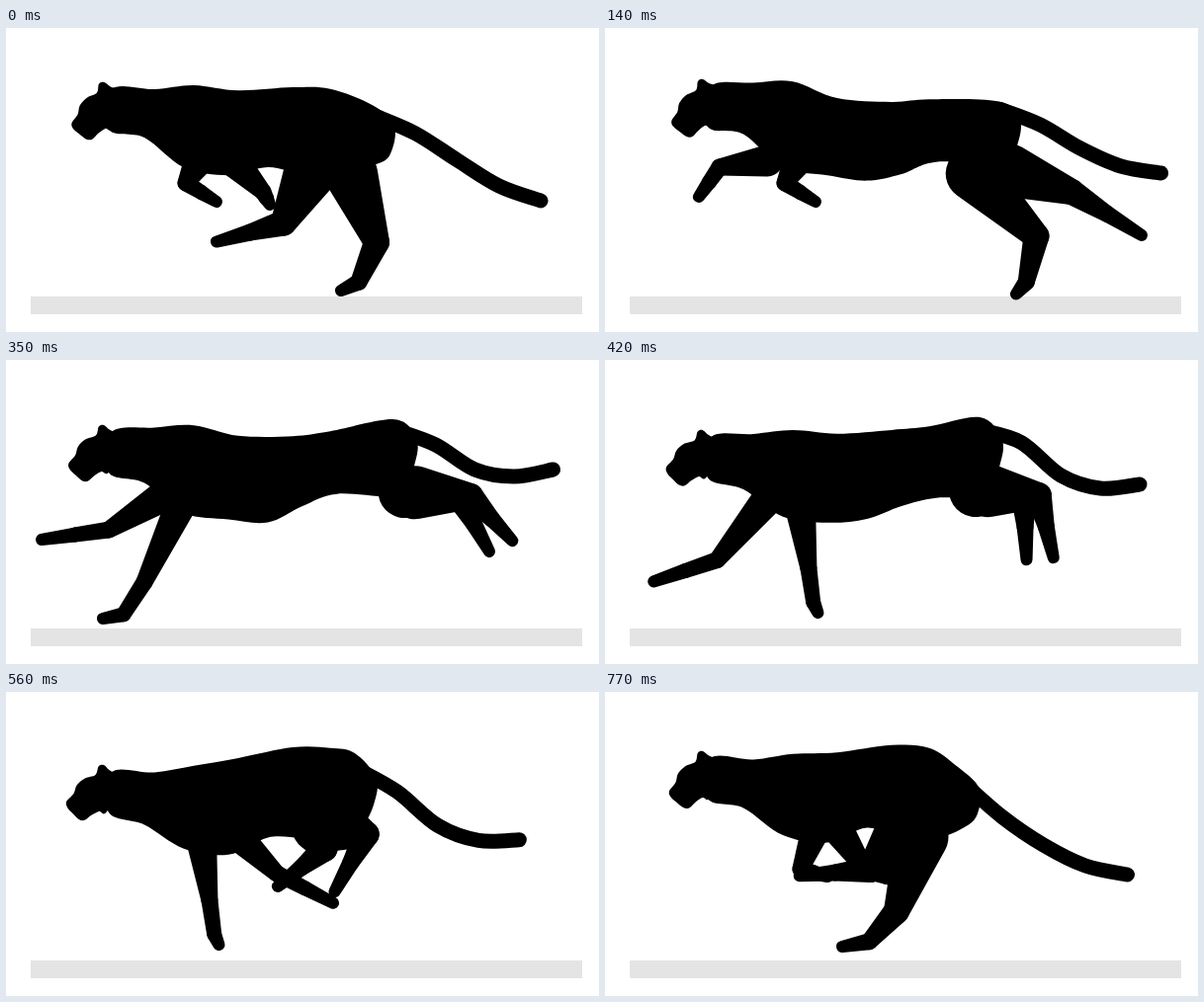
Animation of 600x308 px, one loop 840 ms. Source, as an HTML page with a canvas:

```html
<!DOCTYPE html>
<html lang="en">
<head>
<meta charset="utf-8">
<title>Running cat</title>
<style>
  html, body { margin: 0; width: 100%; height: 100%; overflow: hidden; background: #fff; }
  canvas { display: block; }
</style>
</head>
<body>
<canvas id="stage" width="600" height="308"></canvas>
<script>
const ctx = document.getElementById('stage').getContext('2d');
const STEPS = 12, STEP_MS = 70;

// Paths of the lower legs: step, wrist or hock x y, toe x y.
const frontPath = [
  [0, 182, 157, 213, 176], [1, 131, 172, 139, 187], [2, 116, 141, 95, 171],
  [3, 104, 172, 36, 182], [5, 140, 225, 98, 262], [7, 267, 189, 323, 235],
  [9, 264, 181, 306, 194], [10, 260, 166, 267, 179], [11, 198, 179, 225, 187]
];
const hindPath = [
  [0, 375, 217, 339, 266], [1, 456, 205, 448, 265], [2, 472, 166, 543, 210],
  [3, 490, 141, 560, 148], [5, 458, 138, 489, 194], [7, 380, 140, 355, 203],
  [9, 275, 178, 211, 190], [10, 278, 182, 205, 192], [11, 295, 222, 240, 258]
];
// Tail: step, then heights from the first quarter to the tip.
const tailPath = [
  [0, 107, 134, 160, 175], [2, 98, 122, 140, 147], [3, 72, 76, 72, 53],
  [5, 86, 111, 118, 111], [7, 84, 122, 139, 137], [9, 119, 148, 161, 162],
  [11, 126, 155, 176, 185]
];
// Head outline around the ear tip.
const headShape = [24, 8, 12, 6, 6, 4, 0, 0, -5, 2, -7, 11, -17, 16, -24, 24, -26, 33,
  -32, 42, -30, 48, -24, 53, -17, 58, -11, 58, -5, 52, 2, 47, 10, 46];

// Value that swings once per stride and is largest at the step `peak`.
const swing = (t, mean, amp, peak) =>
  mean + amp * Math.cos((t - peak) * 2 * Math.PI / STEPS);

const shoulder = t => [swing(t, 197, 38, 9), swing(t, 138, 7, 6)];
const hip = t => [swing(t, 362, 62, 3.4), swing(t, 140, 8, 0)];

// Smooth periodic motion through keys that begin with their step.
function follow(keys, t) {
  t = (t + STEPS) % STEPS;
  const n = keys.length;
  const i = keys.findLastIndex(k => k[0] <= t);
  const [a, b, c, d] = [i - 1, i, i + 1, i + 2].map(k => keys[(k + n) % n]);
  const end = i + 1 < n ? c[0] : STEPS;
  const u = (t - b[0]) / (end - b[0]);
  return b.map((v, k) => v + u / 2 * (c[k] - a[k]
    + u * (2 * a[k] - 5 * v + 4 * c[k] - d[k]
    + u * (3 * (v - c[k]) + d[k] - a[k])))).slice(1);
}

// Smooth curve through [x, y] points.
function curve(pts, closed) {
  const n = pts.length;
  const at = i => pts[closed ? (i + n) % n : Math.max(0, Math.min(n - 1, i))];
  ctx.beginPath();
  ctx.moveTo(...at(0));
  for (let i = 0; i < (closed ? n : n - 1); i++) {
    const [a, b, c, d] = [at(i - 1), at(i), at(i + 1), at(i + 2)];
    ctx.bezierCurveTo(b[0] + (c[0] - a[0]) / 6, b[1] + (c[1] - a[1]) / 6,
      c[0] - (d[0] - b[0]) / 6, c[1] - (d[1] - b[1]) / 6, ...c);
  }
}

// Chain of tapered capsules.
function limb(joints, radii) {
  for (let i = 0; i + 1 < joints.length; i++) {
    const [[x1, y1], [x2, y2]] = joints.slice(i);
    const [r1, r2] = radii.slice(i);
    const dir = Math.atan2(y2 - y1, x2 - x1);
    const ratio = (r1 - r2) / Math.hypot(x2 - x1, y2 - y1);
    const side = Math.acos(Math.max(-1, Math.min(1, ratio)));
    ctx.beginPath();
    ctx.arc(x1, y1, r1, dir + side, dir - side);
    ctx.arc(x2, y2, r2, dir - side, dir + side);
    ctx.fill();
  }
}

// The foot bends and flattens as it nears the ground.
function leg(root, path, t, radii) {
  const [x, y, toeX, toeY] = follow(path, t);
  const sag = Math.max(0, toeY - 225) / 2.6;
  limb([root(t), [x, y], [(x + toeX) / 2, (y + toeY) / 2 + sag], [toeX, toeY]], radii);
}

function draw(t) {
  ctx.fillStyle = '#fff';
  ctx.fillRect(0, 0, 600, 308);
  ctx.fillStyle = '#e4e4e4';
  ctx.fillRect(25, 272, 558, 18);
  ctx.fillStyle = ctx.strokeStyle = '#000';

  const at = (x, ...motion) => [x, swing(t, ...motion)];
  const neck = swing(t, 70, 11.5, 7.5);
  const rumpX = swing(t, 397, 29, 3.3), rumpY = swing(t, 89, 9, 11.5);
  curve([
    [107, neck],
    at(150, 68.5, 13, 8), at(190, 64.5, 10.5, 7.7), at(235, 69, 8, 4.5),
    at(290, 65.5, 15, 3.7), at(328, 64.5, 11, 3.5), at(rumpX - 22, 68, 10, 0.3),
    [rumpX, rumpY], [rumpX - 2, rumpY + 26], [rumpX - 15, 137],
    at(335, 142, 9, 9.5), [300, 148], at(265, 151, 14, 4.5),
    at(225, 157, 9, 7), at(180, 150, 10, 7), at(140, 121, 14, 7.5),
    [104, neck + 41]
  ], true);
  ctx.fill();

  // The far hind leg falls further behind as it passes under the body.
  const frontRadii = [16, 8.5, 7.5, 6], hindRadii = [27, 13, 8.5, 6];
  leg(shoulder, frontPath, t, frontRadii);
  leg(shoulder, frontPath, t - 2, frontRadii);
  leg(hip, hindPath, t, hindRadii);
  leg(hip, hindPath, t - swing(t, 1, .6, 0), hindRadii);

  const base = rumpX - 20, reach = swing(t, 541, 25, 3) - base;
  const heights = [rumpY - 9, ...follow(tailPath, t)];
  ctx.lineWidth = 15;
  ctx.lineCap = 'round';
  curve(heights.map((y, i) => [base + reach * i / 4, y]), false);
  ctx.stroke();

  const outline = [];
  for (let i = 0; i < headShape.length; i += 2) outline.push(headShape.slice(i, i + 2));
  ctx.save();
  ctx.translate(99, neck - 7);
  ctx.rotate((neck - 60) * .007);
  curve(outline, true);
  ctx.fill();
  ctx.restore();
}

const start = performance.now();
function tick() {
  draw(Math.floor((performance.now() - start) / STEP_MS) % STEPS);
  requestAnimationFrame(tick);
}
tick();
</script>
</body>
</html>
```
